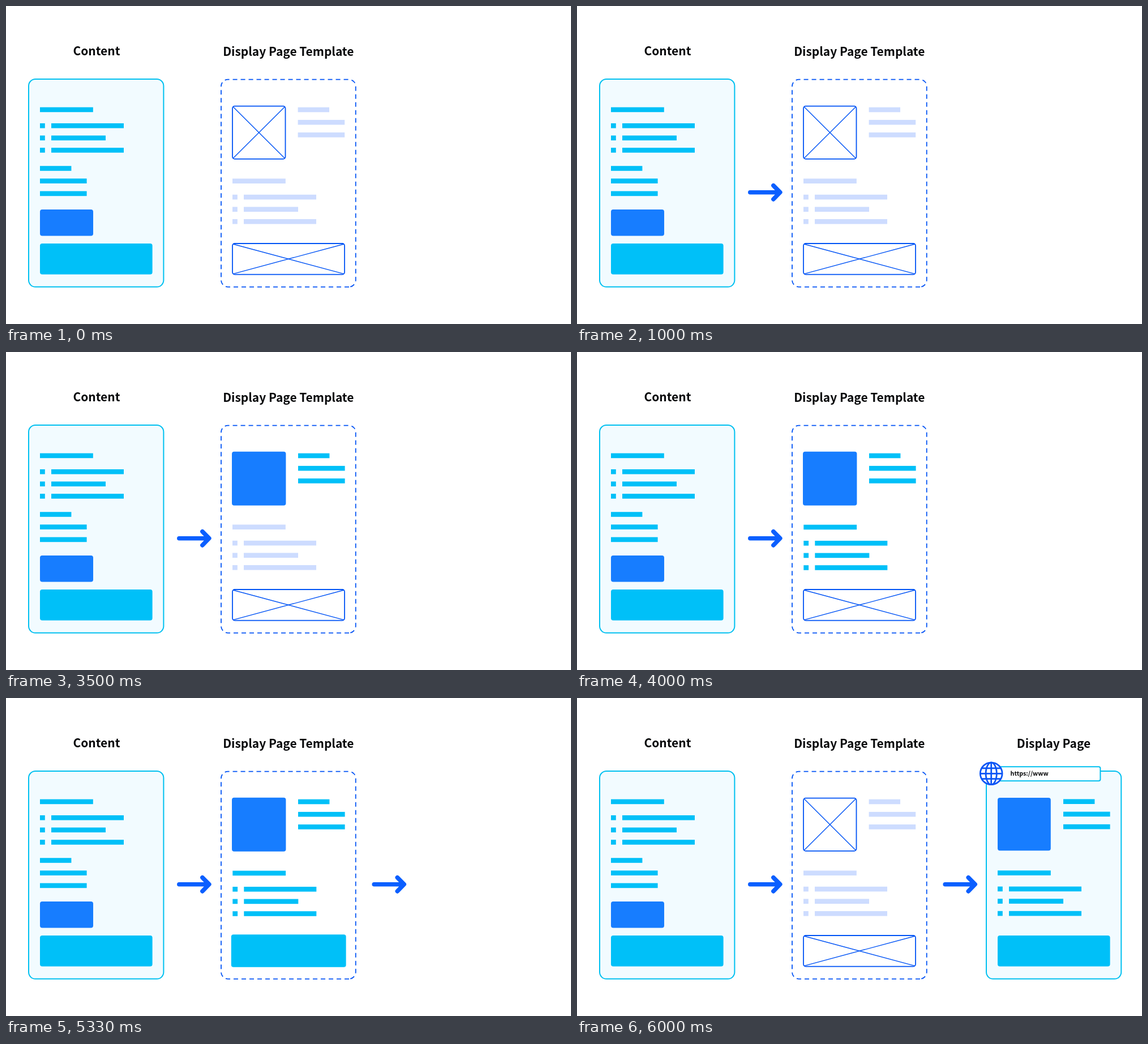
An HTML page that plays this animation: 998x561 px, repeating every 9 s.

```html
<!DOCTYPE html>
<html lang="en">
<head>
<meta charset="utf-8">
<title>Display page flow</title>
<style>
  html, body { margin: 0; width: 100%; height: 100%; overflow: hidden; background: #fff; }
  svg { display: block; width: 998px; height: 561px; }
  text {
    font-family: "Noto Sans CJK JP", "Noto Sans CJK SC", "Noto Sans CJK KR", "Noto Sans", sans-serif;
    font-weight: 600; fill: #060709;
  }
  .title { font-size: 20.9px; text-anchor: middle; }
  .url { font-size: 10.7px; }
  .cyan { fill: #00c0f8; }
  .blue { fill: #177dff; }
  .pale { fill: #cddcff; }
  .card { fill: #f2fbff; stroke: #00c0f0; stroke-width: 2; }
  .field { fill: #fff; stroke: #00c0f0; stroke-width: 2; }
  .wire { fill: none; stroke: #0053f5; stroke-width: 1.8; }
  .cross { fill: none; stroke: #0053f5; stroke-width: 1.4; }
  .dash { fill: none; stroke: #0053f5; stroke-width: 1.8; stroke-dasharray: 8 6; }
  .arrow { fill: none; stroke: #0b5fff; stroke-width: 7.6; stroke-linecap: round; stroke-linejoin: round; }
  .globe { fill: none; stroke: #0b55f5; stroke-width: 2.8; }
</style>
</head>
<body>
<svg id="stage" viewBox="0 0 998 561"></svg>
<script>
const LOOP = 9000, RESET = 6000;
const stage = document.getElementById('stage');

function add(parent, tag, attrs, text) {
  const el = document.createElementNS('http://www.w3.org/2000/svg', tag);
  for (const k in attrs) el.setAttribute(k, attrs[k]);
  if (text) el.textContent = text;
  parent.appendChild(el);
  return el;
}
const group = () => add(stage, 'g', {});
const box = (g, cls, x, y, width, height, rx = 0) =>
  add(g, 'rect', { class: cls, x, y, width, height, rx });
const bar = (g, cls, x, y, w) => box(g, cls, x, y, w, 8.6);
const path = (g, cls, d) => add(g, 'path', { class: cls, d });
const title = (g, x, y, s) => add(g, 'text', { class: 'title', x, y }, s);

// Heading followed by three bullet lines
function list(g, cls, x, y) {
  bar(g, cls, x, y, 93.8);
  [128, 96, 128].forEach((w, i) => {
    const ly = y + 28.3 + i * 21.6;
    bar(g, cls, x, ly, 8.8);
    bar(g, cls, x + 20, ly, w);
  });
}

function lines(g, cls, x, y) {
  [55.4, 82.6, 82.6].forEach((w, i) => bar(g, cls, x, y + i * 22.2, w));
}

function wireBox(g, x, y, w, h) {
  box(g, 'wire', x, y, w, h, 4);
  path(g, 'cross', `M${x + 1} ${y + 1}l${w - 2} ${h - 2}m0 ${2 - h}l${2 - w} ${h - 2}`);
}

function arrow(g, x) {
  path(g, 'arrow', `M${x + 3.8} 328.7h52.6M${x + 44.9} 316.8l11.9 11.9l-11.9 12.2`);
}

function globe(g, cx, cy) {
  add(g, 'circle', { cx, cy, r: 20.5, fill: '#fff' });
  add(g, 'circle', { class: 'globe', cx, cy, r: 19.4 });
  add(g, 'ellipse', { class: 'globe', cx, cy, rx: 9.6, ry: 19.4 });
  path(g, 'globe', `M${cx} ${cy - 19.4}v38.8M${cx - 19.4} ${cy}h38.8` +
    `M${cx - 17} ${cy - 9.4}h34M${cx - 17} ${cy + 9.4}h34`);
}

// Content card
const content = group();
title(content, 160, 87, 'Content');
box(content, 'card', 40, 129, 238.4, 366.6, 12);
list(content, 'cyan', 60, 178.6);
lines(content, 'cyan', 60, 282.2);
box(content, 'blue', 60, 359, 94, 46.6, 4);
box(content, 'cyan', 60, 419, 198.6, 54.6, 4);

// Template frame
const frame = group();
title(frame, 498.8, 88, 'Display Page Template');
path(frame, 'dash', 'M606 495.6H392a12 12 0 0 1-12-12V141.6a12 12 0 0 1 12-12H605.7' +
  'a12 12 0 0 1 12 12V483.6a12 12 0 0 1-12 12');

// Template slots: [fill time, empty look, filled look]
const slots = [
  [3000, g => wireBox(g, 400, 176.7, 93.5, 93.1), g => box(g, 'blue', 399, 175.8, 95.4, 95, 4)],
  [3500, g => lines(g, 'pale', 515.6, 178.7), g => lines(g, 'cyan', 516, 178.7)],
  [4000, g => list(g, 'pale', 400, 304.5), g => list(g, 'cyan', 400.3, 304.7)],
  [4500, g => wireBox(g, 400, 419, 198, 54.6), g => box(g, 'cyan', 397.8, 417.3, 202.8, 57.5, 4)]
];

// Finished page
const page = group();
title(page, 842, 88, 'Display Page');
box(page, 'card', 723, 129, 238.3, 366.6, 12);
box(page, 'field', 732, 121.2, 192.4, 25, 3);
add(page, 'text', { class: 'url', x: 765.6, y: 137.3 }, 'https://www');
globe(page, 731.7, 133.3);
box(page, 'blue', 743, 176, 93.8, 93.2, 4);
lines(page, 'cyan', 859, 178.4);
list(page, 'cyan', 743, 304.3);
box(page, 'cyan', 743, 419, 198.6, 54.6, 4);

// Visible only within [from, to), or only outside it when inverted
function show(el, from, to, inverted = false) {
  const [a, b] = inverted ? ['visible', 'hidden'] : ['hidden', 'visible'];
  const steps = [[0, a], [from, b], [to, to < LOOP ? a : b]];
  if (to < LOOP) steps.push([LOOP, a]);
  el.animate(
    steps.map(([t, visibility]) => ({ offset: t / LOOP, visibility, easing: 'step-end' })),
    { duration: LOOP, iterations: Infinity }
  );
}

for (const [at, empty, filled] of slots) {
  const off = group(), on = group();
  empty(off);
  filled(on);
  show(off, at, RESET, true);
  show(on, at, RESET);
}
for (const [x, at] of [[302, 1000], [646.4, 5330]]) {
  const g = group();
  arrow(g, x);
  show(g, at, LOOP);
}
show(page, RESET, LOOP);
</script>
</body>
</html>
```
